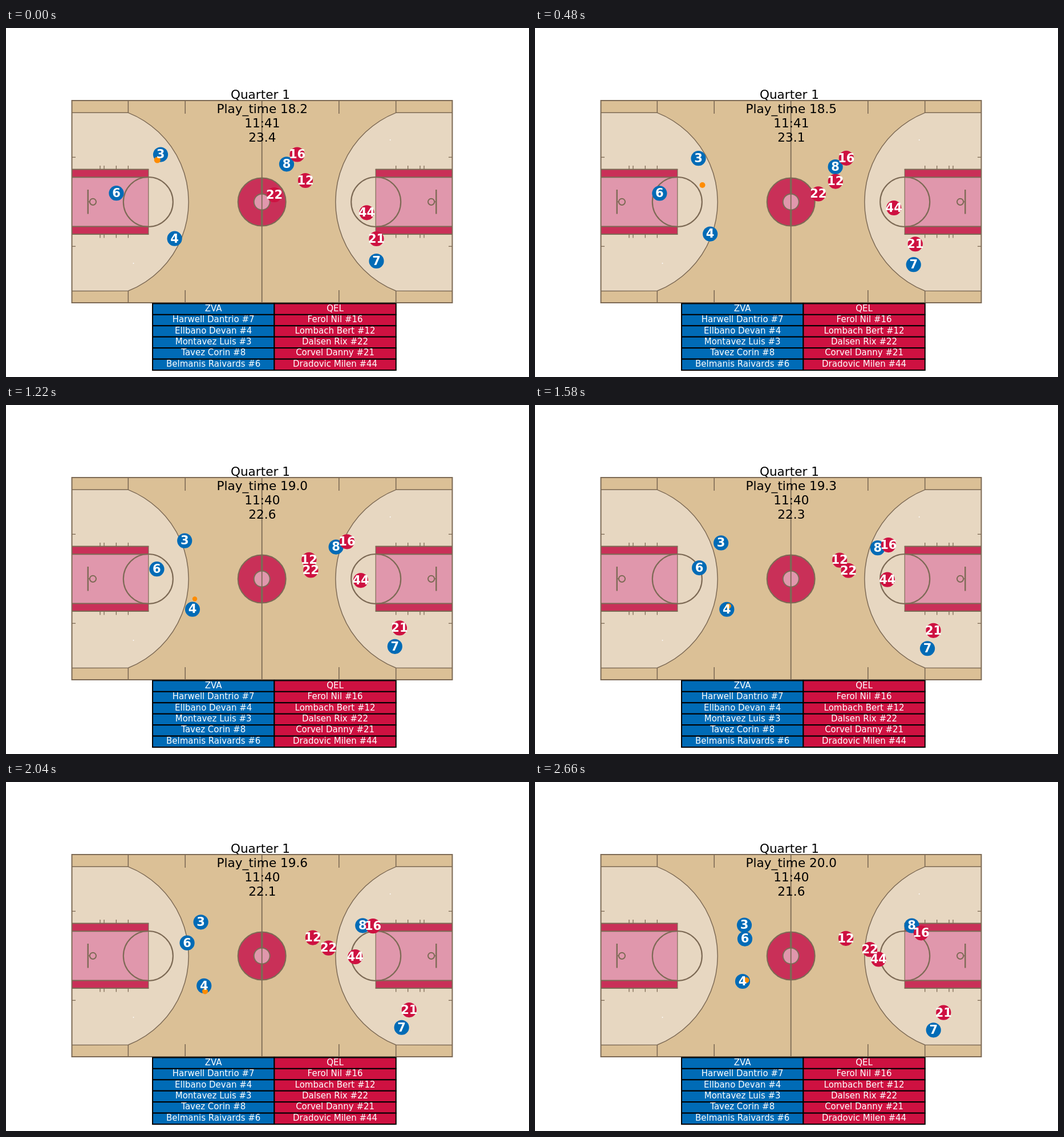
An HTML page with a canvas that plays this animation: 917x611 px, repeating every 2680 ms.

```html
<!DOCTYPE html>
<html lang="en">
<head>
<meta charset="utf-8">
<title>Basketball play</title>
<style>
  html, body { margin: 0; width: 100%; height: 100%; overflow: hidden; background: #fff; }
  canvas { display: block; }
</style>
</head>
<body>
<canvas id="stage" width="917" height="611"></canvas>
<script>
const ctx = document.getElementById('stage').getContext('2d');
const LOOP = 2680, LAST_SAMPLE = 45;
const BLUE = '#006bb6', RED = '#ce1141', ORANGE = '#ff8c00';
const WOOD = '#dbc096', PALE = '#e7d7c1', PINK = '#e097ac', CRIMSON = '#c93058', LINE = '#7d6a55';
const COURT = { left: 115.5, top: 127, right: 782.5, bottom: 481, midX: 448.7, midY: 304.3 };

// Each run is a smooth curve through points evenly spaced in time.
const player = (no, color, ...path) => ({ no, color, path });
const PLAYERS = [
  player(7, BLUE, [649.5, 408], [683.5, 423.7], [698.7, 434.3]),
  player(4, BLUE, [295.6, 368.7], [317.7, 358], [341, 357.6], [364, 349]),
  player(3, BLUE, [271, 221.6], [316.4, 238.6], [367, 250.6]),
  player(8, BLUE, [492, 238.3], [584.3, 249], [660.6, 251.5]),
  player(6, BLUE, [193.5, 289.2], [270.2, 286.7], [368, 274.6]),
  player(16, RED, [510.5, 221.5], [603.5, 240.7], [677, 264.3]),
  player(12, RED, [525, 267], [532, 271], [545, 273.8]),
  player(22, RED, [470.5, 292], [538.3, 289.5], [587, 293.2]),
  player(21, RED, [649.5, 369], [692.2, 391.6], [716.3, 403.7]),
  player(44, RED, [632.5, 323.3], [621, 306.6], [602.3, 310.4])
];

// The bounce pass and dribble run straight between these moments.
const BALL = [
  { at: 0, x: 265.3, y: 231, r: 5.6 },
  { at: 8, x: 293.5, y: 275, r: 5 },
  { at: 14, x: 317.5, y: 316.3, r: 1.8 },
  { at: 21, x: 331, y: 339.5, r: 4.2 },
  { at: 34, x: 349, y: 366.5, r: 5 },
  { at: 45, x: 370.5, y: 347, r: 5 }
];

const ROSTER = [
  ['ZVA', 'QEL'],
  ['Harwell Dantrio #7', 'Ferol Nil #16'],
  ['Ellbano Devan #4', 'Lombach Bert #12'],
  ['Montavez Luis #3', 'Dalsen Rix #22'],
  ['Tavez Corin #8', 'Corvel Danny #21'],
  ['Belmanis Raivards #6', 'Dradovic Milen #44']
];

// Lagrange polynomial through the path, with t from 0 to 1.
function along(path, t) {
  const u = t * (path.length - 1);
  let x = 0, y = 0;
  path.forEach(([px, py], j) => {
    const weight = path.reduce((w, _, k) => k === j ? w : w * (u - k) / (j - k), 1);
    x += px * weight;
    y += py * weight;
  });
  return { x, y };
}

function ballAt(sample) {
  const next = Math.max(1, BALL.findIndex(key => key.at >= sample));
  const a = BALL[next - 1], b = BALL[next];
  const mix = name => a[name] + (b[name] - a[name]) * (sample - a.at) / (b.at - a.at);
  return { x: mix('x'), y: mix('y'), r: mix('r') };
}

function rect(x, y, w, h, color) {
  ctx.fillStyle = color;
  ctx.fillRect(x, y, w, h);
}

function line(x1, y1, x2, y2, width = 1.6) {
  ctx.strokeStyle = LINE;
  ctx.lineWidth = width;
  ctx.beginPath();
  ctx.moveTo(x1, y1);
  ctx.lineTo(x2, y2);
  ctx.stroke();
}

function disc(x, y, r, fill, strokeWidth) {
  ctx.beginPath();
  ctx.arc(x, y, r, 0, Math.PI * 2);
  if (fill) {
    ctx.fillStyle = fill;
    ctx.fill();
  }
  if (strokeWidth) {
    ctx.strokeStyle = LINE;
    ctx.lineWidth = strokeWidth;
    ctx.stroke();
  }
}

function text(str, x, y, font, color) {
  ctx.font = font + ' "DejaVu Sans", sans-serif';
  ctx.fillStyle = color;
  ctx.fillText(str, x, y);
}

function halfCourt() {
  const { left, top, bottom, midY } = COURT;
  const cornerX = 214.3, arcTop = 148.3, arcBottom = 460.5, rimX = 152.4;
  const radius = 167.8, angle = Math.acos((cornerX - rimX) / radius);

  ctx.beginPath();
  ctx.moveTo(left, arcTop);
  ctx.lineTo(cornerX, arcTop);
  ctx.arc(rimX, midY, radius, -angle, angle);
  ctx.lineTo(left, arcBottom);
  ctx.fillStyle = PALE;
  ctx.fill();
  ctx.strokeStyle = LINE;
  ctx.lineWidth = 1.5;
  ctx.stroke();
  line(cornerX, top, cornerX, arcTop);
  line(cornerX, arcBottom, cornerX, bottom);
  line(314.2, top, 314.2, 150);
  line(314.2, 459, 314.2, bottom);

  rect(left, 248, 134.5, 113, CRIMSON);
  rect(left, 261, 134.5, 87, PINK);
  line(249.8, 247, 249.8, 361.5, 1.2);
  for (const y of [247.6, 261.2, 347.6, 361]) line(left, y, 250.3, y, 2);
  disc(249.3, midY + 0.2, 43.5, null, 2.2);

  for (const x of [165, 172, 193.3, 214.3]) {
    line(x, 241, x, 247, 1.3);
    line(x, 361, x, 367.5, 1.3);
  }
  for (const y of [226.3, 382.3]) line(left, y, 122, y, 1.3);

  line(143.7, 283, 143.7, 325.5, 2.4);
  line(143.7, midY, 147, midY, 1.5);
  disc(rimX, midY, 5.6, null, 2);
}

function court() {
  const { left, top, right, bottom, midX, midY } = COURT;
  rect(left, top, right - left, bottom - top, WOOD);
  halfCourt();
  ctx.save();
  ctx.translate(left + right, 0);
  ctx.scale(-1, 1);
  halfCourt();
  ctx.restore();

  disc(midX, midY + 0.2, 42, CRIMSON, 2);
  line(midX, top, midX, bottom, 1.8);
  line(midX, 262, midX, 347, 3.6);
  disc(midX, midY + 0.2, 14, PINK, 2);
  line(midX, 291, midX, 318, 1.8);
  disc(673.7, 196, 0.9, '#fff');
  disc(223.5, 412, 0.9, '#fff');

  ctx.strokeStyle = LINE;
  ctx.lineWidth = 2;
  ctx.strokeRect(left, top, right - left, bottom - top);
}

function table() {
  const x = 257, y = 482.4, cellW = 213.4, cellH = 19.45;
  ROSTER.forEach((row, r) => row.forEach((name, c) => {
    const cx = x + c * cellW, cy = y + r * cellH;
    rect(cx, cy, cellW, cellH, c ? RED : BLUE);
    ctx.strokeStyle = '#000';
    ctx.lineWidth = 2;
    ctx.strokeRect(cx, cy, cellW, cellH);
    text(name, cx + cellW / 2, Math.round(cy + 13.3), '15px', '#fff');
  }));
}

function scoreboard(seconds) {
  const clock = Math.floor(701.801 - seconds);
  const minutes = Math.floor(clock / 60), rest = String(clock % 60).padStart(2, '0');
  // All lines but the first begin with a space, which moves them right.
  const rows = [
    'Quarter 1',
    ` Play_time ${(18.2 + seconds).toFixed(1)}`,
    ` ${minutes}:${rest}`,
    ` ${(23.42 - seconds).toFixed(1)}`
  ];
  rows.forEach((row, i) => text(row, 445.9, 124 + 25 * i, '21.6px', '#000'));
}

function draw(ms) {
  // Samples come in pairs, held for 20 ms and 100 ms.
  const sample = 2 * Math.floor(ms / 120) + (ms % 120 >= 20 ? 1 : 0);
  rect(0, 0, 917, 611, '#fff');
  ctx.textAlign = 'center';
  court();
  table();

  const spots = PLAYERS.map(p => ({ ...p, ...along(p.path, sample / LAST_SAMPLE) }));
  const ball = ballAt(sample);
  for (const p of spots) disc(p.x, p.y, 13.1, p.color);
  disc(ball.x, ball.y, ball.r, ORANGE);
  for (const p of spots) text(p.no, p.x, p.y + 6.8, 'bold 21px', '#fff');
  scoreboard(sample * 0.04);
}

const start = performance.now();
function tick() {
  draw((performance.now() - start) % LOOP);
  requestAnimationFrame(tick);
}
tick();
</script>
</body>
</html>
```
